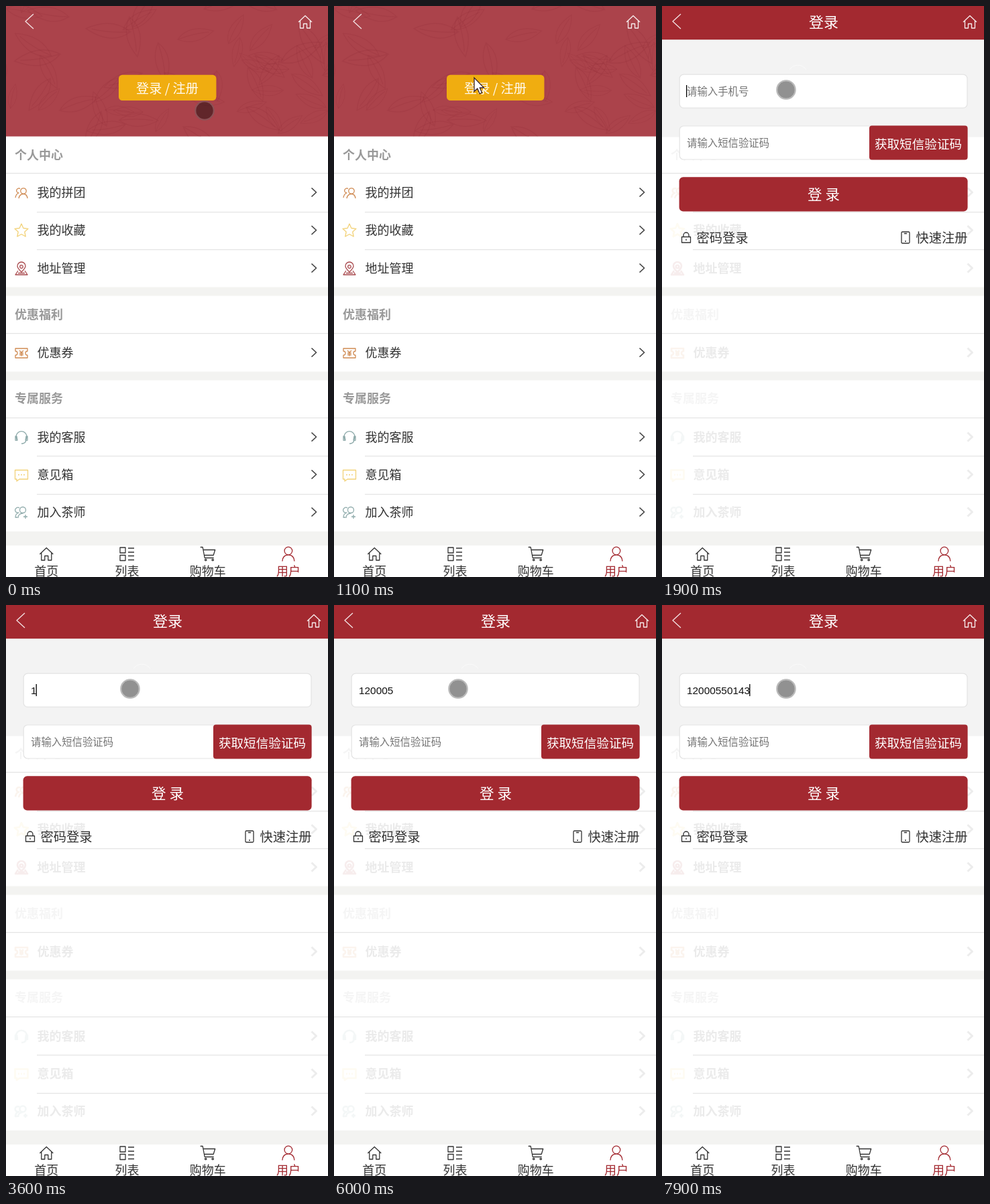
These frames come from a looping animation (480x852 px, 8 s). An HTML page:

```html
<!DOCTYPE html>
<html lang="zh-CN">
<head>
<meta charset="utf-8">
<style>
html, body { margin: 0; width: 100%; height: 100%; overflow: hidden; background: #fff; }
svg { display: block; width: 480px; height: 852px; }
text { font-family: "Noto Sans CJK SC", "Noto Sans CJK", "Noto Sans", sans-serif; white-space: pre; }
#digits { font-family: "Liberation Sans", Arial, sans-serif; }
</style>
</head>
<body>
<svg id="stage" viewBox="0 0 480 852"></svg>
<script>
const RED = '#a32930', INK = '#333', LINE = '#e3e3e3', BAND = '#f3f3f1';
const ORANGE = '#cf8a52', YELLOW = '#f2d279', TEAL = '#8fabab', BRICK = '#a8484c';

// drawing helpers; text is placed by its visual centre line
const text = (x, mid, size, s, fill = INK, extra = '') =>
  `<text x="${x}" y="${mid + size * 0.38}" font-size="${size}" fill="${fill}" ${extra}>${s}</text>`;
const centred = (x, mid, size, s, fill) => text(x, mid, size, s, fill, 'text-anchor="middle"');
const rect = (x, y, w, h, fill, r = 0, extra = '') =>
  `<rect x="${x}" y="${y}" width="${w}" height="${h}" rx="${r}" fill="${fill}" ${extra}/>`;
const icon = (x, y, d, stroke, w = 1.3) =>
  `<path transform="translate(${x} ${y})" d="${d}" fill="none" stroke="${stroke}" stroke-width="${w}" stroke-linejoin="round"/>`;
const ring = (x, y, r) => `M${x - r} ${y}a${r} ${r} 0 1 1 ${2 * r} 0a${r} ${r} 0 1 1 ${-2 * r} 0`;

const HOME = 'M-10 .5L0-9L10 .5M-7.5-1.5V9.5H-2.5V3H2.5V9.5H7.5V-1.5';
const BACK = 'M6-11L-6 0L6 11';
const NEXT = 'M-3.5-6.5L3.5 0L-3.5 6.5';
const CART = 'M-11-10H-7.5L-4.5 6H9M-6.8-6H11L8.5 2H-5.2' + ring(-3, 9, 1.2) + ring(7.5, 9, 1.2);
const LIST = 'M-10.5-9.5h8v8h-8zM-10.5 2h8v8h-8zM1.5-8.5H10.5M1.5-2.5H10.5M1.5 3H10.5M1.5 9H10.5';
const USER = ring(0, -4.5, 5.8) + 'M-9 11C-8.5 4-5 1.5 0 1.5S8.5 4 9 11';
const PAIR = ring(3, -3, 4.2) + 'M-4 8C-3 3 0 1.5 3 1.5S8.5 4 9 8M-2-6.5A3.5 3.5 0 1 0-4 0C-7 1-8.5 4-9 7';
const PIN = ring(0, -3, 2.3) + 'M0 5C-4 1-6-1-6-4A6 6 0 0 1 6-4C6-1 4 1 0 5M-5 3L-9 9H9L5 3M-5 6.5H5';
const COUPON = 'M-9-7H9V-3A3 3 0 0 0 9 3V7H-9V3A3 3 0 0 0-9-3ZM-3-4L0-1L3-4M0-1V4.5M-3 0H3M-3 2.5H3';
const HEADSET = 'M-6 4A8 8 0 1 1 6 4M-7-2H-9V4H-6ZM7-2H9V4H6ZM7 4C6 8 3 9 0 9';
const BUBBLE = 'M-9.5-7.5H9.5V6H-3L-7 9V6H-9.5ZM-5-.5h2M-1-.5h2M3-.5h2';
const JOIN = ring(2, -4, 4.5) + 'M-5 8C-5 3-2 1 2 1M-3-7A4 4 0 1 0-4 0C-7 1-9 4-9 7H-6M3 6H9M6 3V9';
const STAR = 'M' + Array.from({ length: 10 }, (_, i) => {
  const a = i * Math.PI / 5, r = i % 2 ? 5 : 10.5;
  return (r * Math.sin(a)).toFixed(1) + ' ' + (-r * Math.cos(a)).toFixed(1);
}).join('L') + 'Z';

const heads = [[222, '个人中心'], [460, '优惠福利'], [585, '专属服务']];
const rows = [
  [278, '我的拼团', PAIR, ORANGE], [334.5, '我的收藏', STAR, YELLOW], [391, '地址管理', PIN, BRICK],
  [517, '优惠券', COUPON, ORANGE], [643, '我的客服', HEADSET, TEAL],
  [699, '意见箱', BUBBLE, YELLOW], [755, '加入茶师', JOIN, TEAL]
];
const rules = [[249, 0], [307, 46], [363, 46], [488, 0], [614, 0], [671, 46], [728, 46]];
const bands = [[419.5, 13], [545.5, 13], [784, 21]];

// the faded list behind the form has softer, heavier strokes
function list(faded) {
  const weight = faded ? 2.6 : 1.3;
  const glyphs = heads.map(([y, s]) => text(13, y, 18, s, '#999', 'font-weight="700"')).join('') +
    rows.map(([y, s, d, c]) => icon(23, y + 1, d, c, weight) +
      text(46.5, y, 18, s, INK, `font-weight="${faded ? 700 : 400}"`) +
      icon(459, y, NEXT, '#444', weight + 0.4)).join('');
  return bands.map(([y, h]) => rect(0, y, 480, h, BAND)).join('') +
    rules.map(([y, x]) => rect(x, y, 480 - x, 1.2, LINE)).join('') +
    `<g opacity="${faded ? 0.1 : 1}">${glyphs}</g>`;
}

function leaves() {
  let seed = 11, out = '';
  const rnd = () => (seed = seed * 16807 % 2147483647) / 2147483647;
  for (let i = 0; i < 60; i++) {
    const x = rnd() * 480, y = rnd() * 195, a = rnd() * 360, k = 0.8 + rnd() * 0.7;
    out += `<path transform="translate(${x} ${y}) rotate(${a}) scale(${k})" d="M0 0Q18-16 46 0Q20 14 0 0Q22-3 40 0"/>`;
  }
  return `<g fill="none" stroke="#8b2935" stroke-opacity=".18" clip-path="url(#top)">${out}</g>`;
}

const userPage = rect(0, 0, 480, 194.6, '#ab434b') + leaves() +
  icon(35, 23, BACK, '#f4e4e5') + icon(446, 23.5, HOME, '#f8eeee') +
  rect(168, 102.7, 145.4, 38.4, '#f0ad10', 5.5) + centred(240.5, 122.5, 19.2, '登录 / 注册', '#fffaf0') +
  list(false);

// form rows share one height and are stacked with one gap
const LEFT = 25.6, RIGHT = 455.6, ROW_H = 51.2;
const rowY = i => 101.6 + i * 76.8;
const field = i => rect(LEFT + 0.6, rowY(i) + 0.6, RIGHT - LEFT - 1.2, ROW_H - 1.2, '#fff', 6,
  `stroke="${LINE}" stroke-width="1.2"`);
const button = (x, i, r) => rect(x, rowY(i), RIGHT - x, ROW_H, RED, r);

const loginPage = rect(0, 50, 480, 145.5, '#f3f3f3') + list(true) +
  '<path d="M190 95A15 15 0 0 1 215 95" fill="none" stroke="#fff" stroke-opacity=".6"/>' +
  rect(0, 0, 480, 50.2, RED) + icon(22, 23, BACK, '#f4e4e5') + centred(241, 23.5, 22, '登录', '#fff') +
  icon(459, 23.5, HOME, '#f8eeee') +
  field(0) + field(1) +
  text(37, 204, 15.4, '请输入短信验证码', '#757575') +
  button(309, 1, 4) + centred(382, 205.5, 18.6, '获取短信验证码', '#fff') +
  button(LEFT, 2, 6) + centred(241, 281, 21.5, '登 录', '#fff') +
  icon(36, 346, 'M-6.5-1.5H6.5V7H-6.5ZM-4-1.5V-4A4 4 0 0 1 4-4V-1.5M0 1.5V4', INK) +
  text(51.5, 346, 19.3, '密码登录') +
  icon(363, 345.5, 'M-4.5-8.5H4.5Q6-8.5 6-7V7Q6 8.5 4.5 8.5H-4.5Q-6 8.5-6 7V-7Q-6-8.5-4.5-8.5M-2-6H2M-1 5.5H1', INK) +
  text(378.5, 346, 19.3, '快速注册') +
  `<g id="hint">${text(37, 127, 15.4, '请输入手机号', '#757575')}</g>` +
  '<text id="digits" x="37" y="132.5" font-size="15.4" fill="#111"></text>' +
  rect(36, 118, 1.3, 18, '#000', 0, 'id="caret"');

const tabs = [['首页', HOME], ['列表', LIST], ['购物车', CART], ['用户', USER]];
const tabBar = rect(0, 805, 480, 47, '#fff') + tabs.map(([s, d], i) => {
  const x = 60.3 + i * 120.2, c = i === 3 ? RED : INK;
  return icon(x, 817.5, d, c) + centred(x, 843.5, 18, s, c);
}).join('');

document.getElementById('stage').innerHTML =
  '<clipPath id="top"><path d="M0 0H480V194.6H0Z"/></clipPath>' +
  `<g id="user">${userPage}</g><g id="login">${loginPage}</g>${tabBar}` +
  '<g id="touch"><circle r="12.8" fill-opacity=".43"/>' +
  '<circle r="13.8" fill="none" stroke="#666" stroke-width="2" stroke-opacity=".45"/></g>' +
  '<path id="arrow" d="M0 0V20.5L4.8 16.2L8.2 24L11.6 22.4L8.3 15H14.5Z" fill="#fff" stroke="#352029" stroke-width="1.3"/>';

const $ = id => document.getElementById(id);
const LOOP = 8000, NUMBER = '12000550143', DIGIT_W = 8.56;
const moves = [[0, 296, 156], [900, 209, 107], [1200, 209, 107], [1300, 203, 104], [1400, 203, 104], [1700, 185, 125]];
const keys = [3600, 3900, 4100, 4500, 4700, 4800, 6100, 7500, 7600, 7800, 7900];
// [time, visible]
const blinks = [[1900, 1], [2300, 0], [2800, 1], [3300, 0], [3600, 1], [5200, 0], [5700, 1],
  [6000, 0], [6100, 1], [6700, 0], [7100, 1]];

function pointer(t) {
  const i = moves.findIndex(m => m[0] > t);
  if (i < 0) return moves[moves.length - 1].slice(1);
  const [t0, x0, y0] = moves[i - 1], [t1, x1, y1] = moves[i];
  const p = (t - t0) / (t1 - t0), e = p * p * (3 - 2 * p);
  return [x0 + (x1 - x0) * e, y0 + (y1 - y0) * e];
}
const show = (id, on) => $(id).setAttribute('visibility', on ? 'inherit' : 'hidden');

function render(time) {
  const t = Math.floor(time / 100) * 100;
  const login = t >= 1200, arrow = t >= 1000 && t < 1300;
  const typed = keys.filter(k => k <= t).length;
  const blink = blinks.filter(b => b[0] <= t).pop();
  const at = `translate(${pointer(t)})`;
  show('user', !login);
  show('login', login);
  show('touch', !arrow);
  show('arrow', arrow);
  show('hint', login && !typed);
  show('caret', login && blink && blink[1]);
  $('touch').setAttribute('transform', at);
  $('arrow').setAttribute('transform', at);
  $('digits').textContent = NUMBER.slice(0, typed);
  $('caret').setAttribute('x', 36 + typed * DIGIT_W);
}

const start = performance.now();
function tick() {
  render((performance.now() - start) % LOOP);
  requestAnimationFrame(tick);
}
tick();
</script>
</body>
</html>
```
